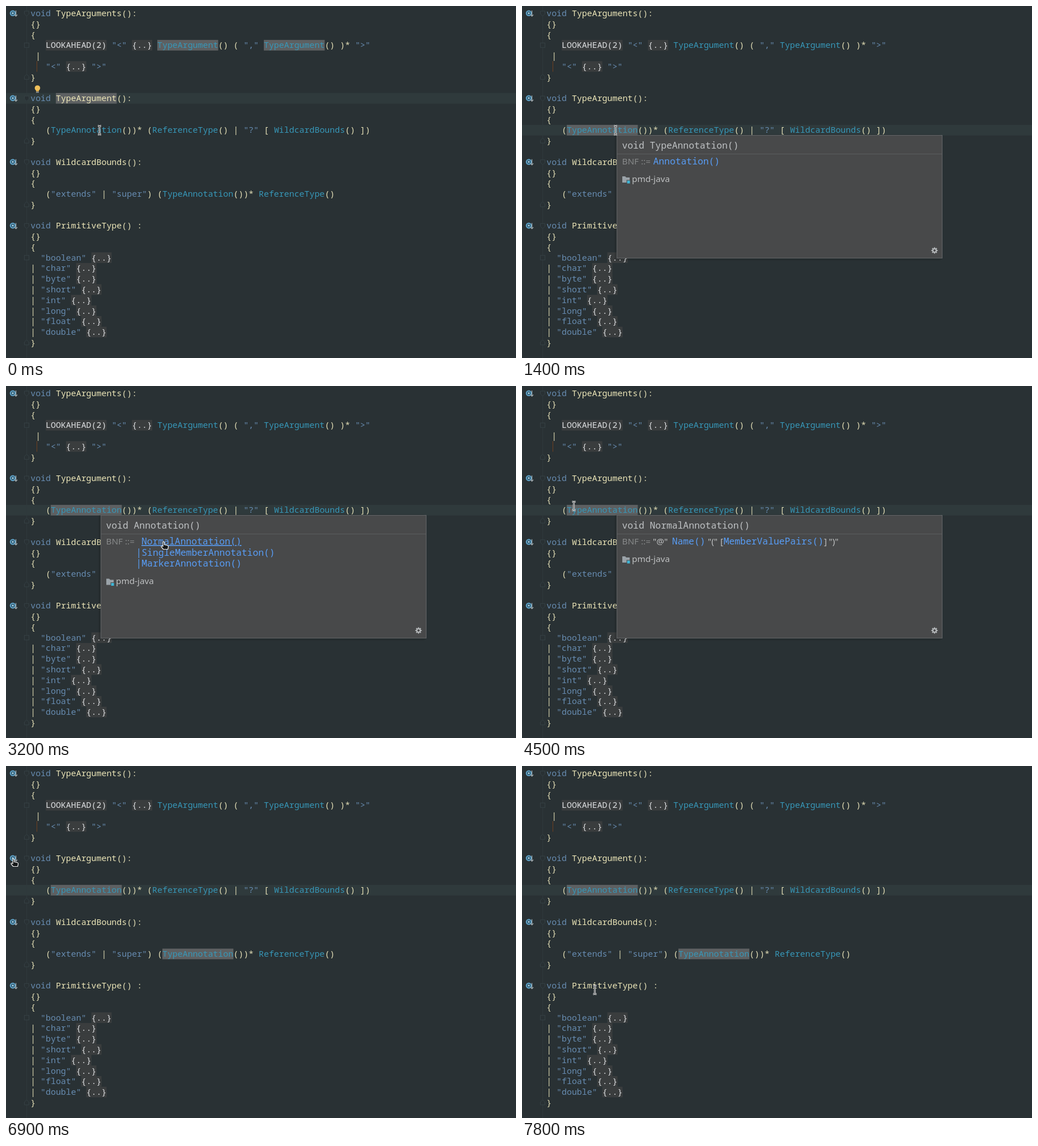
Recreate the animation shown at these times as an HTML page. Size 900 by 622 pixels, loop 8000 ms.

```html
<!DOCTYPE html>
<html lang="en">
<head>
<meta charset="utf-8">
<title>Grammar quick documentation</title>
<style>
  html, body { margin: 0; width: 100%; height: 100%; overflow: hidden; background: #293134; }
  svg { display: block; width: 900px; height: 622px; }
  text { white-space: pre; font-variant-ligatures: none; }
  .code { font: 14.92px "Noto Sans Mono", monospace; }
  .doc { font: 16.35px "Noto Sans Mono", monospace; fill: #bfc2c4; }
  .sans { font: 15.3px "Noto Sans", sans-serif; fill: #bfc1c2; }
  .dim { fill: #87898a; }
  .link { fill: #589df6; }
  .hover .first { text-decoration: underline; }
  .tip { font: 13.3px "Noto Sans", sans-serif; fill: #bfc1c2; }
</style>
</head>
<body>
<svg id="stage" viewBox="0 0 900 622"></svg>
<script>
const LOOP = 8000, LEFT = 43.2, COL = 8.952, ROW = 18.77;
const colX = c => LEFT + c * COL;
const rowY = r => 3.6 + r * ROW;
const stage = document.getElementById('stage');

function add(parent, tag, attrs = {}, text) {
  const el = document.createElementNS('http://www.w3.org/2000/svg', tag);
  for (const k in attrs) el.setAttribute(k, attrs[k]);
  if (text) el.textContent = text;
  parent.append(el);
  return el;
}
const group = (parent = stage) => add(parent, 'g');
const box = (parent, x, y, width, height, fill, more) =>
  add(parent, 'rect', { x, y, width, height, fill, ...more });
const path = (parent, d, more) => add(parent, 'path', { d, fill: 'none', ...more });
const label = (parent, x, y, cls, text) => add(parent, 'text', { x, y, class: cls }, text);
const show = (el, on) => { el.style.display = on ? '' : 'none'; };

// Grammar text
const lines = `void TypeArguments():
{}
{
   LOOKAHEAD(2) "<" {..} TypeArgument() ( "," TypeArgument() )* ">"
 |
   "<" {..} ">"
}

void TypeArgument():
{}
{
   (TypeAnnotation())* (ReferenceType() | "?" [ WildcardBounds() ])
}

void WildcardBounds():
{}
{
   ("extends" | "super") (TypeAnnotation())* ReferenceType()
}

void PrimitiveType() :
{}
{
  "boolean" {..}
| "char" {..}
| "byte" {..}
| "short" {..}
| "int" {..}
| "long" {..}
| "float" {..}
| "double" {..}
}`.split('\n');

const INK = { word: '#678cb1', decl: '#ece6b8', ref: '#3797b8', fold: '#dcdee0', mark: '#e4dfb6' };

function kind(token, line) {
  if (token === '{..}' || token.startsWith('LOOK')) return 'fold';
  if (token === 'void' || token[0] === '"') return 'word';
  if (/^\w/.test(token)) return line.startsWith('void') ? 'decl' : 'ref';
  return 'mark';
}

function drawCode() {
  const g = group();
  lines.forEach((line, r) => {
    for (const m of line.matchAll(/LOOKAHEAD\(2\)|\{\.\.\}|"[^"]*"|\w+|[^\s\w"]+/g)) {
      const type = kind(m[0], line), x = colX(m.index);
      if (type === 'fold') box(g, x, rowY(r), m[0].length * COL, ROW, '#3a3d3e');
      label(g, x, rowY(r) + 14.4, 'code', m[0]).setAttribute('fill', INK[type]);
    }
  });
  path(g, `M54.5 ${rowY(5)}v${ROW}`, { stroke: '#70401f' });
}

function drawGutter() {
  const g = group();
  path(g, 'M36.5 0V622', { stroke: '#2f393c' });
  const fold = { stroke: '#354044', fill: '#293134' };
  lines.forEach((line, r) => {
    const y = rowY(r) + ROW / 2;
    if (line.startsWith('void')) {
      path(g, `M32.5 ${y - 4}h8v5l-4 4l-4 -4z`, fold);
      add(g, 'circle', { cx: 12, cy: y - .3, r: 5.3, fill: '#5d9fc4' });
      add(g, 'circle', { cx: 12, cy: y - .3, r: 2.4, fill: '#a5d2e8', stroke: '#26485a', 'stroke-width': 1.3 });
      path(g, `M17.5 ${y - 5}v10m-2.6 -2.6l2.6 2.8l2.6 -2.8`, { stroke: '#a9b3b7', 'stroke-width': 1.2 });
    } else if (line === '}') {
      path(g, `M32.5 ${y + 4}h8v-5l-4 -4l-4 4z`, fold);
    } else if (r === 3 || r === 23) {
      box(g, 32.5, y - 4, 8, 8, '#293134', { stroke: '#354044' });
    }
  });
}

const lineBar = box(stage, 0, 0, 900, ROW, '#2f3a3c');
drawGutter();

function marks(spots, len) {
  const g = group();
  for (const [c, r] of spots) box(g, colX(c), rowY(r), len * COL, ROW, '#5d6062');
  return g;
}
const argMarks = marks([[25, 3], [46, 3], [5, 8]], 12);
const annMarks = marks([[4, 11], [26, 17]], 14);
drawCode();
// Marked identifiers sit above fold boxes but below their own text, so code is drawn last.

const bulb = group();
add(bulb, 'circle', { cx: 55.5, cy: 145, r: 4.8, fill: '#f0c05a' });
box(bulb, 53, 149, 5, 2, '#d9a94c');
box(bulb, 53, 151.6, 5, 1.6, '#a5a8aa');

const caret = box(stage, 0, 0, 2, ROW, '#e0e2e4');

// Documentation popup
const popup = group();
for (let i = 1; i <= 6; i++)
  box(popup, 168 - i, 229 - i / 2, 573 + i, 216 + i * 1.5, '#000', { opacity: .03, rx: i });
box(popup, 167.5, 228.5, 574, 217, '#48494a', { stroke: '#626567' });
path(popup, 'M168 261.5H741', { stroke: '#5b5d5f' });
path(popup, Array.from({ length: 8 }, (_, i) => {
  const a = i * Math.PI / 4, c = Math.cos(a), s = Math.sin(a);
  return `M${728 + 3.5 * c} ${432 + 3.5 * s}L${728 + 5.6 * c} ${432 + 5.6 * s}`;
}).join(''), { stroke: '#b4b7b9', 'stroke-width': 2.2 });
add(popup, 'circle', { cx: 728, cy: 432, r: 3, fill: 'none', stroke: '#b4b7b9', 'stroke-width': 2 });

// parts: [x, row, class, text]
function page(title, moduleY, parts) {
  const g = group(popup);
  label(g, 176.5, 251.5, 'doc', `void ${title}()`);
  label(g, 176.5, 280, 'sans dim', 'BNF');
  label(g, 210, 280, 'sans dim', '::=');
  for (const [x, r, cls, text] of parts) label(g, x, 280 + r * 19.7, cls, text);
  const y = moduleY;
  path(g, `M177 ${y - 4}h5l2 2h6v9h-13z`, { fill: '#9aa2a8' });
  box(g, 184.5, y + 2.5, 6.5, 6.5, '#48494a');
  box(g, 185.5, y + 3.5, 5, 5, '#3fb6d6');
  label(g, 194, y + 5.5, 'sans', 'pmd-java');
  return g;
}
const pages = [
  page('TypeAnnotation', 305, [[231.5, 0, 'doc link first', 'Annotation()']]),
  page('Annotation', 344.5, [
    [239, 0, 'doc link first', 'NormalAnnotation()'],
    [229.5, 1, 'doc link', '|'], [239.3, 1, 'doc link', 'SingleMemberAnnotation()'],
    [229.5, 2, 'doc link', '|'], [239.3, 2, 'doc link', 'MarkerAnnotation()']]),
  page('NormalAnnotation', 305, [
    [231, 0, 'sans', '"@"'], [264.7, 0, 'doc link first', 'Name()'],
    [328, 0, 'sans', '"("'], [350, 0, 'sans', '['],
    [355.7, 0, 'doc link', 'MemberValuePairs()'],
    [533, 0, 'sans', ']'], [541.5, 0, 'sans', '")"']])
];

const tip = group();
path(tip, 'M14 163.5L22.5 157V149.5H354.5V177.5H22.5V170z', { fill: '#4b4d4e', stroke: '#636668' });
label(tip, 31, 168, 'tip', 'Click to navigate to the generated node class');

// Mouse pointers, each with its hot spot at 0,0
function pointer(d, more) {
  const g = group();
  path(g, d, { stroke: '#f2f2f2', 'stroke-linejoin': 'round', ...more });
  return g;
}
const beamPath = 'M-3 -7.5H-1.2L0 -6.5L1.2 -7.5H3M0 -6.5V6.5M-3 7.5H-1.2L0 6.5L1.2 7.5H3';
const pointers = {
  beam: pointer(beamPath, { 'stroke-width': 2.8 }),
  arrow: pointer('M0 0V14L3.4 11L5.8 16L8 15L5.8 10.3H10z', { fill: '#16191a' }),
  hand: pointer('M-1 0Q.5 -1 1.5 .5V5L7 6.2Q8.8 6.8 8.6 8.5L7.6 13H-.4L-4 8.6Q-4 6.6 -2.2 7.2L-1 8z',
    { fill: '#16191a', 'stroke-width': 1.2 })
};
path(pointers.beam, beamPath, { stroke: '#16191a', 'stroke-width': .9 });

const mouse = [
  [0, 'beam', 165, 219.5],
  [1700, 'beam', 176, 222], [1800, 'arrow', 205, 238], [1900, 'arrow', 250, 262], [2000, 'hand', 278, 275.5],
  [4100, 'arrow', 232, 257], [4200, 'beam', 138, 213], [4300, 'beam', 99, 219], [4500, 'beam', 91.5, 212],
  [5400, 'beam', 67, 202], [5600, 'arrow', 29, 180], [5700, 'arrow', 8, 167], [6000, 'hand', 13, 164.5],
  [7400, 'hand', 12, 165], [7700, 'arrow', 38, 235], [7800, 'beam', 128.5, 395.5]
];
// [time, column, row]; no column means hidden
const carets = [
  [0], [500, 14, 8], [700, 14, 11], [1300], [5200, 6, 11], [5700], [6300, 6, 11], [6900], [7400, 6, 11], [7800]
];
const pageSteps = [[0, -1], [1400, 0], [3200, 1], [3800, 2], [5200, -1]];

const stepAt = (steps, t) => steps.findLast(s => s[0] <= t);

function draw(t) {
  lineBar.setAttribute('y', rowY(t < 700 ? 8 : 11));
  show(bulb, t < 700);
  show(argMarks, t < 900);
  show(annMarks, t >= 900);

  const [, c, r] = stepAt(carets, t);
  show(caret, c !== undefined);
  if (c !== undefined) {
    caret.setAttribute('x', Math.floor(colX(c)) - .5);
    caret.setAttribute('y', rowY(r));
  }

  const current = stepAt(pageSteps, t)[1];
  show(popup, current >= 0);
  pages.forEach((p, i) => show(p, i === current));
  popup.classList.toggle('hover', t >= 2000 && t < 4100);
  show(tip, t >= 7000 && t < 7700);

  const [, shape, x, y] = stepAt(mouse, t);
  for (const k in pointers) show(pointers[k], k === shape);
  pointers[shape].setAttribute('transform', `translate(${x} ${y})`);
}

const start = performance.now();
function frame() {
  draw((performance.now() - start) % LOOP);
  requestAnimationFrame(frame);
}
frame();
</script>
</body>
</html>
```
